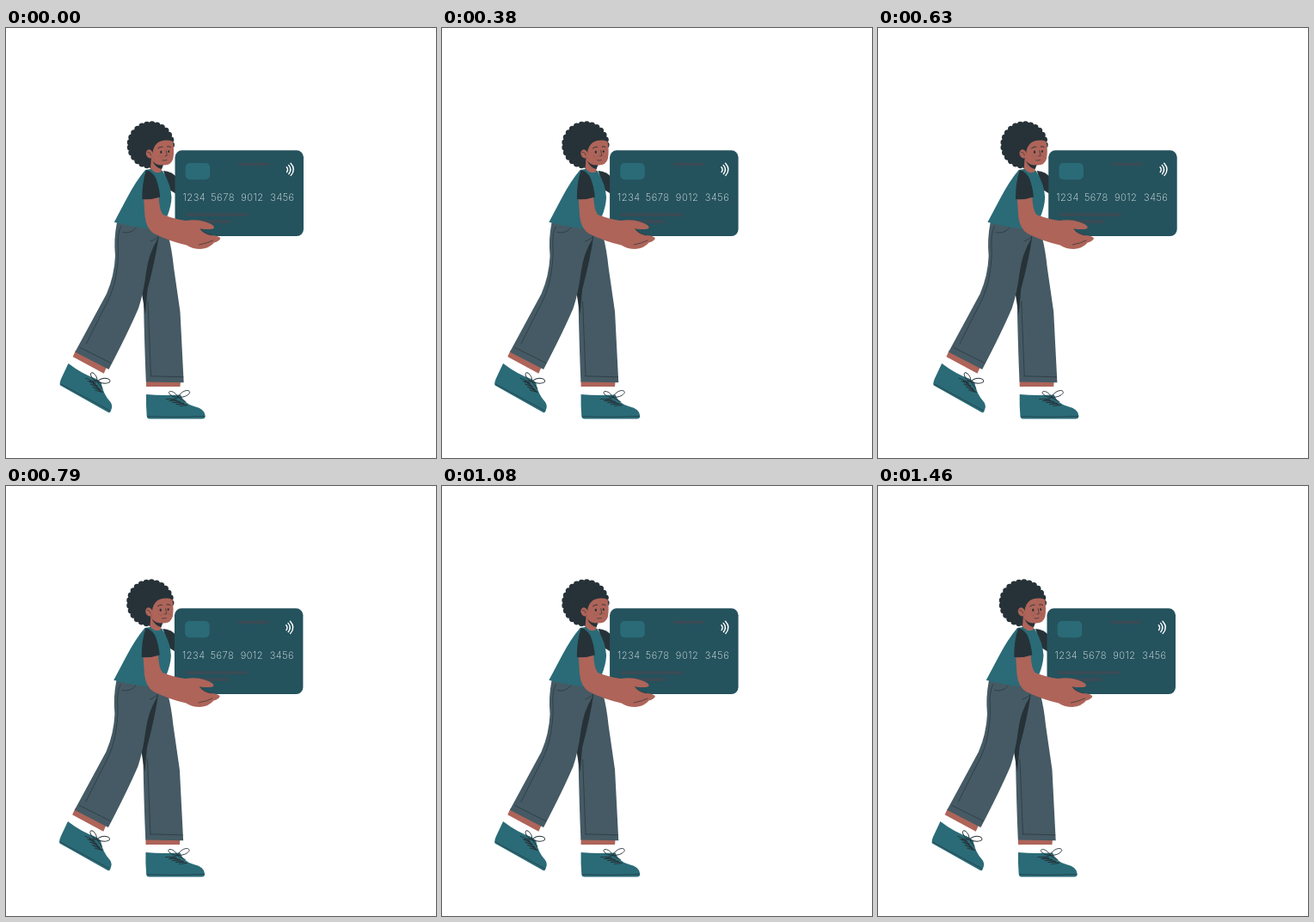
An HTML page that plays this animation: 500x500 px, repeating every 1.5 s.

```html
<!DOCTYPE html>
<html lang="en">
<head>
<meta charset="utf-8">
<style>
html, body { margin: 0; width: 100%; height: 100%; overflow: hidden; background: #fff; }
svg { display: block; width: 100vw; height: 100vh; }
.teal { fill: #2a6b77; }
.dark { fill: #263238; }
.skin { fill: #ae6459; }
.denim { fill: #455a64; }
.line { fill: none; stroke: #263238; stroke-width: .9; stroke-linecap: round; stroke-linejoin: round; }
.fine { stroke-width: .65; }
.print { fill: #3b4b55; }
.digits { fill: #e6eeef; font: 200 11.2px Inter, Roboto, sans-serif; letter-spacing: .5px; }
</style>
</head>
<body>
<svg viewBox="0 0 500 500">
<g id="scene">
  <!-- far sleeve -->
  <path class="dark" d="M183 166Q193 167 198 173V193L190 188Z"/>

  <!-- card -->
  <rect x="196.500" y="142.300" width="149.500" height="99.800" rx="8" fill="#24525d"/>
  <rect class="teal" x="208.700" y="157" width="28.500" height="19.300" rx="5"/>
  <rect class="print" x="270.500" y="156.800" width="35.500" height="3.200" rx="1.600"/>
  <rect class="print" x="208.700" y="215.200" width="72.500" height="3.600" rx="1.800"/>
  <rect class="print" x="216.500" y="223.300" width="44.500" height="3.600" rx="1.800"/>
  <path fill="none" stroke="#fff" stroke-width="1.400" stroke-linecap="round" d="M326.300 161.800Q328.700 164.400 326.500 167.600M328.600 159.400Q333 164.400 328.800 169.800M331 157.200Q337.600 164.400 331.200 171.600"/>
  <g class="digits" id="digits"></g>

  <!-- front leg -->
  <path class="skin" d="M163 410L203 410L202.500 417L163 417Z"/>
  <path class="denim" d="M160 238L189 243Q193 258 195 278L202.500 330L206.700 412.200L162.800 411.500Q161 370 160 318Z"/>
  <path class="dark" d="M168 247L177.500 243Q174 268 164.500 304L162 333L158 309Z"/>
  <!-- back leg -->
  <path class="skin" d="M81 375L117 394.500L113.800 401.700L77.700 382.200Z"/>
  <path class="denim" d="M129 226L178 234L176 246Q166 262 163 284Q160 308 154 326Q142 354 119.500 397L80.300 376.700L117 309Q126 288 127 265Q125 246 129 226Z"/>
  <path class="line fine" d="M133.500 231Q129 240 130.500 257Q131 272 126.500 295Q123 310 112 330L93.500 367M86 371.500L122 389.500M135.500 237.500Q145 240 151.500 232M168 248Q175 246 180 239M165 318L168.500 404.500M168 404.800L206 405.800"/>

  <!-- back foot -->
  <path class="teal" d="M72.500 390L64.500 407Q61.800 413 63 415.500L118.500 446.700Q121 448.200 122 445Q124.500 439 121.500 435Q113 426 110.500 412L105 408Q88 402 72.500 390Z"/>
  <path class="line fine" d="M63.500 414L120.500 444.700"/>
  <g id="backLace" transform="translate(106 411) rotate(24)"></g>
  <!-- front foot -->
  <path class="teal" d="M163 426Q181 427.500 203 426.500Q207 437 219 440Q231.500 443 231.700 451Q231.700 454.500 228 454.500H167Q164 454.500 163.700 451Q162.700 440 163 426Z"/>
  <path class="line fine" d="M164.500 451.700Q197 453 231 451.500"/>
  <g id="frontLace" transform="translate(200 429.500)"></g>

  <!-- torso -->
  <path class="teal" d="M162 165Q151 178 140.500 198L125.800 225.700Q151 233 179 234L187 220Q192 208 192.500 197Q192 182 182 166L174 163Z"/>

  <!-- head -->
  <g id="hair" class="dark"></g>
  <path class="skin" d="M169 150L168 163Q174 171 180.500 167L182 159Z"/>
  <path class="dark" d="M170 154Q175 161 183 159L181 164Q174 163 170 154Z"/>
  <path class="skin" d="M171 142Q173 134 180 131.500Q188 129.500 194 132Q196 143 194.300 152Q192 160 183 159.500Q174 158 170 151Z"/>
  <ellipse class="skin" cx="166.800" cy="146.400" rx="4" ry="5.200" transform="rotate(-20 167 146)"/>
  <path class="line fine" d="M164.800 144.500Q168 144 168.500 148M186.200 142.500L187.200 148.500L184.800 149M182 153.800Q184.500 154.500 187 153.500"/>
  <path class="line" d="M176.800 139.800Q179 137.800 182 138.200M187.500 137.900Q189.500 137 191.500 138.500"/>
  <ellipse class="dark" cx="180.300" cy="144.300" rx="1.100" ry="1.700"/>
  <ellipse class="dark" cx="189.200" cy="143.500" rx="1" ry="1.600"/>
  <g class="dark" opacity=".65" id="freckles"></g>

  <!-- near arm -->
  <path class="skin" d="M160 195L177.500 195Q178 211 182.500 217Q197 222.500 209 224Q222 222 232 225.500Q243 229 242 232.500Q240 235 226 233.500Q229 239 239 241Q249 242 249.300 244.700Q248 248 242 249.500Q237 256 226 257Q217 257 210 252.500Q190 248 172 239Q163 233 161.500 219Z"/>
  <path class="line fine" d="M226 233.500Q229 239 239 241M224.500 252Q235 250 240.500 247"/>
  <path class="dark" d="M163 165Q170 167 174 174Q178 184 179.300 196.500Q169 200 158.300 199Q158 181 163 165Z"/>
</g>
</svg>
<script>
const $ = id => document.getElementById(id);
const LOOP = 1500, STEPS = 36;
// horizontal shake, one value per tenth of the loop
const SHAKE = [0, -1, 2, -4, 4, -4, 4, -4, 2, -1, 0];

const dot = (x, y, r) => `<circle cx="${x}" cy="${y}" r="${r}"/>`;

function drawHair() {
  let s = dot(168.3, 136, 24.8);
  const n = 25;
  for (let i = 0; i < n; i++) {
    const a = 2 * Math.PI * i / n;
    const x = Math.cos(a), y = Math.sin(a);
    if (x > 0.2 && y > 0.1) continue;
    s += dot(168.3 + 24 * x, 136 + 24 * y, 3.7);
  }
  $('hair').innerHTML = s;
}

function drawLace(id) {
  let s = 'M0 0C-3 -8 -13 -9 -10 -4Q-7 0 0 0C4 -9 15 -10 13.500 -5Q10 0 0 0L9 5M0 0L-8 3';
  for (let i = 0; i < 4; i++) {
    const x = -14 + i * 4, y = 2 + i * 2;
    s += `M${x} ${y}Q${x + 7} ${y - 1} ${x + 13} ${y + 1}L${x + 4} ${y + 2}`;
  }
  $(id).innerHTML = `<path class="line" d="${s}"/>`;
}

function drawDigits() {
  const groups = [['1234', 205.5], ['5678', 238.3], ['9012', 273.3], ['3456', 307.3]];
  $('digits').innerHTML = groups.map(([t, x]) => `<text x="${x}" y="201.300">${t}</text>`).join('');
}

function drawFreckles() {
  const spots = [[178, 149], [180.5, 150.5], [182.5, 148.7], [189, 148], [191, 149.5]];
  $('freckles').innerHTML = spots.map(([x, y]) => dot(x, y, 0.4)).join('');
}

function shakeAt(p) {
  const k = Math.min(Math.floor(p * 10), 9);
  return SHAKE[k] + (SHAKE[k + 1] - SHAKE[k]) * (p * 10 - k);
}

function render(ms) {
  const step = Math.floor(((ms % LOOP) + 5) * STEPS / LOOP) % STEPS;
  $('scene').setAttribute('transform', `translate(${shakeAt(step / (STEPS - 1)).toFixed(3)} 0)`);
}

drawHair();
drawLace('backLace');
drawLace('frontLace');
drawDigits();
drawFreckles();

const start = performance.now();
function tick() {
  render(performance.now() - start);
  requestAnimationFrame(tick);
}
render(0);
requestAnimationFrame(tick);
</script>
</body>
</html>
```
